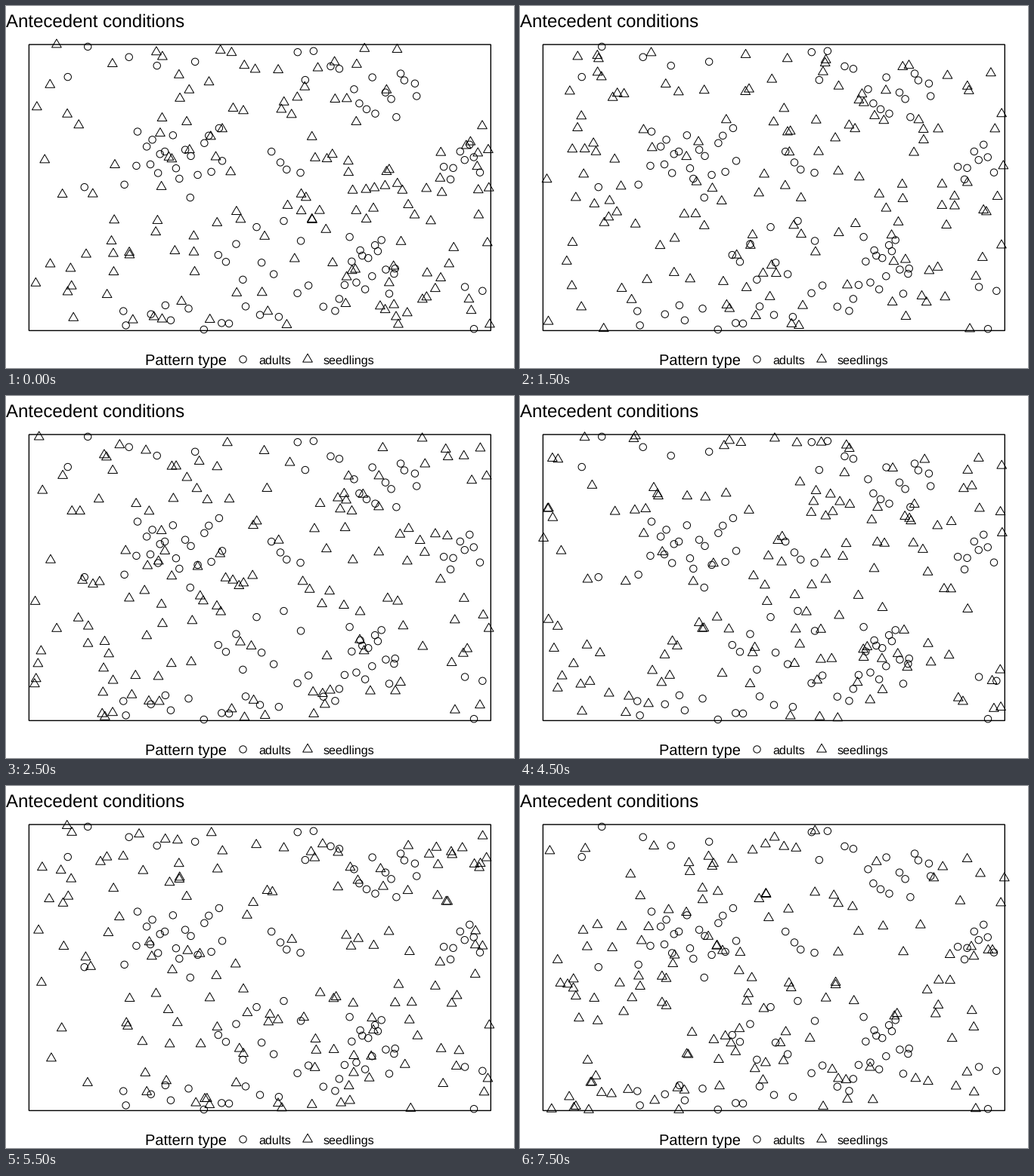
These frames come from a looping animation (672 px wide and 480 px high, 8000 ms). A matplotlib script:

```python
import numpy as np
import matplotlib.pyplot as plt
from matplotlib.animation import FuncAnimation
from matplotlib.collections import PolyCollection
from matplotlib.patches import Rectangle

WIDTH, HEIGHT, DPI = 672, 480, 72  # at 72 dpi one point is one pixel
LEFT, RIGHT, TOP, BOTTOM = 30.4, 641.3, 51.1, 430.4
RADIUS = 4.7
STROKE = 1.0
SEEDLINGS = 148
STEP_MS, FRAMES = 500, 16

plt.rcParams["font.family"] = "Liberation Sans"
plt.rcParams["text.hinting"] = "none"

# Stands of adult trees: number of trees, x range, y range
STANDS = [
    (5, (65, 270), (50, 95)),
    (5, (378, 448), (51, 101)),
    (12, (458, 549), (86, 149)),
    (18, (166, 290), (160, 230)),
    (4, (102, 282), (218, 258)),
    (4, (338, 394), (191, 227)),
    (8, (579, 628), (182, 232)),
    (11, (272, 412), (283, 388)),
    (16, (446, 519), (305, 382)),
    (3, (416, 450), (382, 410)),
    (12, (137, 365), (395, 429)),
    (3, (607, 641), (351, 430)),
]

TRIANGLE = RADIUS * np.array([(0, -1.555), (1.347, 0.778), (-1.347, 0.778)])


def spread(rng, count, span):
    """One random place in each of count equal slots, in random order."""
    slots = (rng.permutation(count) + rng.random(count)) / count
    return span[0] + slots * (span[1] - span[0])


def adults():
    rng = np.random.default_rng(5)
    return np.vstack([
        np.column_stack([spread(rng, n, xs), spread(rng, n, ys)])
        for n, xs, ys in STANDS
    ])


def seedlings(draw):
    """Seedlings scattered at random over the whole plot."""
    rng = np.random.default_rng(100 + draw)
    return rng.uniform((LEFT, TOP), (RIGHT, BOTTOM), (SEEDLINGS, 2))


def triangles(centres):
    return np.asarray(centres)[:, None, :] + TRIANGLE


def add_circles(centres):
    x, y = np.transpose(centres)
    ax.scatter(x, y, s=(2 * RADIUS) ** 2, facecolors="none",
               edgecolors="black", linewidths=STROKE, clip_on=False)


def add_triangles(centres):
    marks = PolyCollection(triangles(centres), facecolors="none",
                           edgecolors="black", linewidths=STROKE)
    return ax.add_collection(marks, autolim=False)


def label(x, baseline, text, size):
    ax.text(x, baseline, text, size=size, va="baseline", color="black")


fig = plt.figure(figsize=(WIDTH / DPI, HEIGHT / DPI), dpi=DPI,
                 facecolor="white")
ax = fig.add_axes([0, 0, 1, 1])

add_circles(adults())
young = add_triangles(seedlings(0))
ax.add_patch(Rectangle((LEFT, TOP), RIGHT - LEFT, BOTTOM - TOP, fill=False,
                       edgecolor="black", linewidth=1.4, snap=False))

label(0, 28, "Antecedent conditions", 24)
label(183.5, 476, "Pattern type", 20)
add_circles([(313.5, 468.5)])
label(334.5, 475, "adults", 16)
add_triangles([(399, 468.5)])
label(420, 475, "seedlings", 16)

ax.set_xlim(0, WIDTH)
ax.set_ylim(HEIGHT, 0)
ax.axis("off")


def update(frame):
    # A new draw every second, the first one after half a second.
    young.set_verts(triangles(seedlings((frame + 1) // 2)))
    return [young]


anim = FuncAnimation(fig, update, frames=FRAMES, interval=STEP_MS,
                     repeat=True, blit=False)
plt.show()
```
